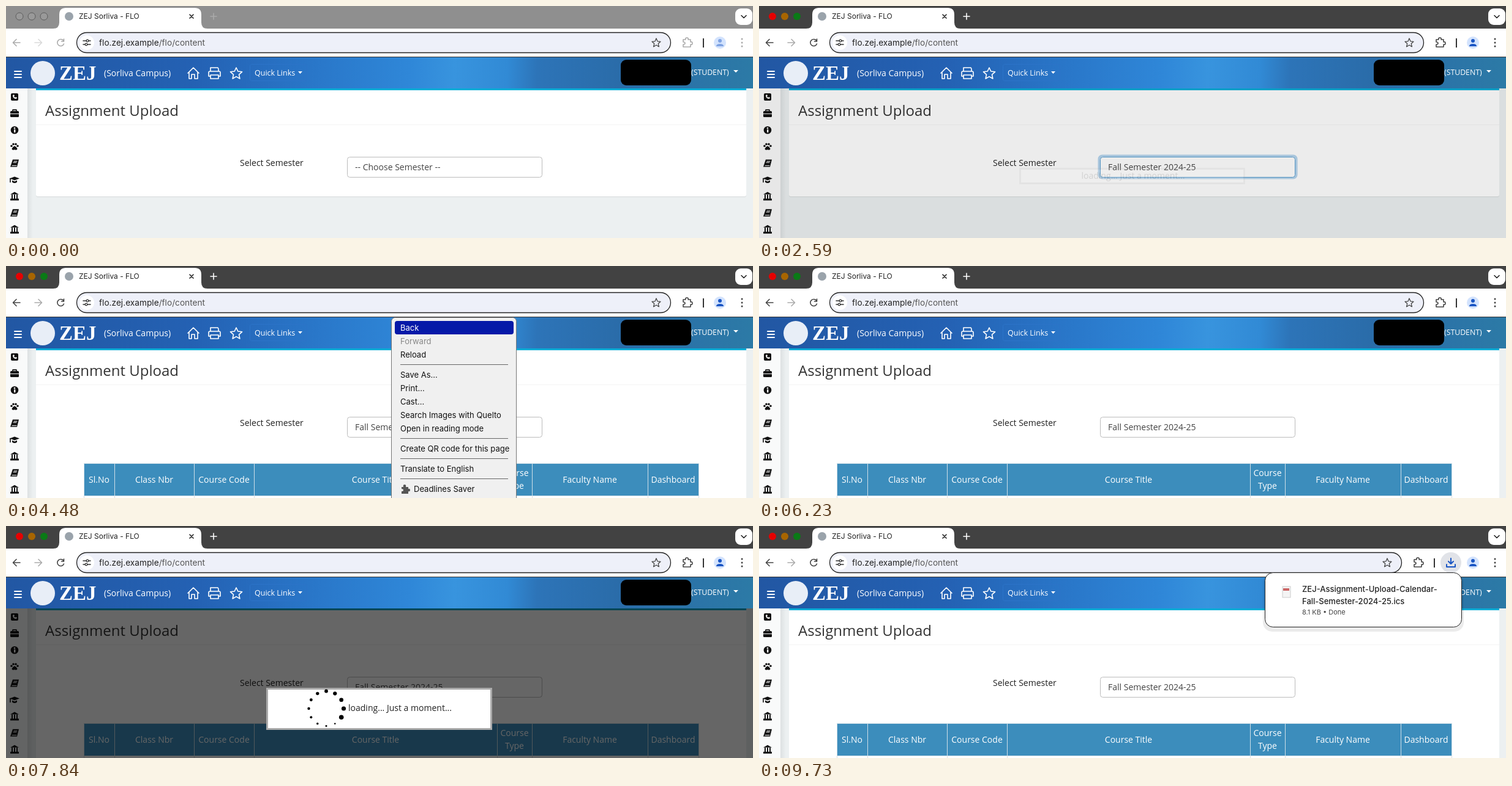
An HTML page that plays this animation: 1220 by 380 pixels, repeating every 9.94 s.

```html
<!DOCTYPE html>
<html lang="en">
<head>
<meta charset="utf-8">
<style>
html, body { margin: 0; width: 100%; height: 100%; overflow: hidden; background: #ecf0f1; }
svg { display: block; }
text { font: 14px "Open Sans", sans-serif; fill: #222; white-space: pre; }
.ui text, text.ui { font-family: Inter, sans-serif; }
.mid { text-anchor: middle; }
.line { fill: none; stroke: currentColor; stroke-width: 1.6; stroke-linecap: round; stroke-linejoin: round; }
.white { fill: #fff; }
.th { fill: #fff; text-anchor: middle; }
</style>
</head>
<body>
<svg id="stage" width="1220" height="380" viewBox="0 0 1220 380"></svg>
<script>
const LOOP = 9940;
const stage = document.getElementById('stage');
const $ = id => document.getElementById(id);

const text = (x, y, s, attrs = '') => `<text x="${x}" y="${y}" ${attrs}>${s}</text>`;
const rect = (x, y, w, h, fill, attrs = '') =>
  `<rect x="${x}" y="${y}" width="${w}" height="${h}" fill="${fill}" ${attrs}/>`;
const circle = (x, y, r, fill, attrs = '') => `<circle cx="${x}" cy="${y}" r="${r}" fill="${fill}" ${attrs}/>`;
const line = (d, attrs = '') => `<path class="line" d="${d}" ${attrs}/>`;
const at = (x, y, body) => `<g transform="translate(${x} ${y})">${body}</g>`;

// Loading messages: [fade in starts, fade out starts]
const loads = [[2545, 3170], [6290, 6850], [6850, 7050], [7460, 8050], [8050, 8700]];

const options = ['-- Choose Semester --', 'Fall Semester 2024-25', 'Summer Semester 2023-24', 'Winter Semester 2023-24'];

const menu = [
  [101, 'Back'], [123, 'Forward'], [145, 'Reload'], [178, 'Save As...'], [200, 'Print...'], [222, 'Cast...'],
  [244, 'Search Images with Quelto'], [266, 'Open in reading mode'],
  [299, 'Create QR code for this page'], [332, 'Translate to English'], [365, 'Deadlines Saver']
];
// Hovered menu row: [time, row]
const hovers = [[4480, 0], [4550, 2], [4620, 3], [4690, 4], [4760, 6], [4830, 7], [4970, 8], [5110, 9], [5180, 10]];

const icons = {
  phone: rect(-6, -6, 12, 12, '#111', 'rx="2"') +
    '<path d="M-3-3q0 6 6 6l1-2-2-1-1 1q-2-1-2-2l1-1-1-2z" fill="#fff"/>',
  briefcase: rect(-7, -4, 14, 10, '#111', 'rx="1.5"') + line('M-3-4v-2h6v2') + rect(-7, 0, 14, 1, '#fff'),
  info: circle(0, 0, 6.3, '#111') + rect(-1, -1, 2.4, 5, '#fff') + circle(0, -3.2, 1.3, '#fff'),
  paw: '<path d="M0-1q3 1 4.500 4.500q0 3-4.500 1.500q-4.500 1.500-4.500-1.500q1.500-3.500 4.500-4.500z"/>' +
    [[-5, -1], [-2, -4], [2, -4], [5, -1]].map(([x, y]) => circle(x, y, 1.7, '#111')).join(''),
  book: '<path d="M-3-6h10l-3 12h-11z"/>' + line('M-1-3h5M-2-1h5M-4 4h7', 'style="color:#fff;stroke-width:1"'),
  cap: '<path d="M-8-2l8-3 8 3-8 3zM-4 1l4 2 4-2v3q-4 3-8 0z"/>' + line('M-7-2v6'),
  bank: '<path d="M-7-3l7-4 7 4zM-7 4h14v3h-14z"/>' + line('M-4-2v6M0-2v6M4-2v6', 'style="stroke-width:2"')
};
const sidebar = ['phone', 'briefcase', 'info', 'paw', 'book', 'cap', 'bank', 'book', 'bank']
  .map((name, i) => at(14, 149 + i * 27.1, icons[name])).join('');

function tableHead(edges, top, height, labels) {
  return edges.slice(1).map((right, i) => {
    const left = edges[i], mid = (left + right) / 2, lines = labels[i].split('|');
    return rect(left + .5, top + .5, right - left, height, '#3c8dbc', 'stroke="#cfdfe8"') +
      lines.map((s, k) => text(mid, top + height / 2 + 5 + (k - (lines.length - 1) / 2) * 21, s, 'class="th"')).join('');
  }).join('');
}

const listCols = [127, 177, 307, 405, 802, 859, 1048, 1131];
const detailCols = [72, 333, 489, 881, 1037, 1187];

const page = `
  ${rect(0, 135, 1220, 245, '#ecf0f1')}
  ${rect(0, 135, 35, 245, '#f9fafa')}
  ${rect(35, 135, 9, 245, 'url(#edge)')}
  <g style="color:#111" fill="#111">${sidebar}</g>
  ${rect(49, 137, 1160, 176, '#d5d9da', 'id="shade" rx="3"')}
  ${rect(49, 135, 1160, 177, '#fff', 'id="card" rx="3"')}
  ${rect(49, 135, 1160, 3, '#00acd6')}
  ${rect(49, 194, 1160, 1, '#f4f4f4')}
  ${text(64, 180, 'Assignment Upload', 'style="font-size:24px;fill:#333"')}
  <g id="list">
    ${text(382, 262, 'Select Semester')}
    ${rect(555.5, 245.5, 322, 36, 'none', 'id="ring" rx="5" stroke="#b5d5ee" stroke-width="4"')}
    ${rect(557.5, 247.500, 318, 33, '#fff', 'id="box" rx="4" stroke="#bbb"')}
    ${text(570, 269, '', 'id="choice" style="fill:#444"')}
    <g id="courses">
      ${tableHead(listCols, 323, 53, ['Sl.No', 'Class Nbr', 'Course Code', 'Course Title', 'Course|Type', 'Faculty Name', 'Dashboard'])}
      ${listCols.map(x => rect(x, 377, 1, 3, '#ddd')).join('')}
    </g>
  </g>
  <g id="details">
    ${tableHead(detailCols, 226, 32, ['Semester', 'Course Code', 'Course Title', 'Course Type', 'Class Number'])}
    ${detailCols.map(x => rect(x, 259, 1, 31, '#ddd')).join('')}
    ${rect(72, 290, 1116, 1, '#ddd')}
    ${text(77, 279, 'Fall Semester 2024-25')}
    ${text(338, 279, '', 'id="code"')}
    ${text(886, 279, 'LO')}
    ${text(1043, 279, '', 'id="number"')}
    ${['Notes:', '1. File size (Max. upto 4MB)', '2. File type should be pdf,xls,xlsx,doc,docx']
      .map((s, i) => text(75, 328 + i * 21, s, 'style="fill:#f00"')).join('')}
  </g>`;

const header = `
  ${rect(0, 84, 1220, 51, 'url(#sky)')}
  ${line('M14 107h11M14 112h11M14 117h11', 'style="color:#fff;stroke-width:2"')}
  ${circle(60, 110, 20, '#e8eef7')}
  ${text(87, 121, 'ZEJ', 'class="white" style="font:bold 33px \'Liberation Serif\',serif"')}
  ${text(160, 115, '(Sorliva Campus)', 'class="white"')}
  <g style="color:#fff">
    ${line('M297 110l9-9 9 9M299 109v10h4v-7h5v7h5v-10')}
    ${line('M334 107v-6h12l1 2v4M334 115h-3v-6q0-2 2-2h15q2 0 2 2v6h-3M334 113h13v6h-13z')}
    ${at(376, 110, line('M0-9l2.800 6 6.700.8-5 4.500 1.400 6.700-5.900-3.400-5.900 3.400 1.400-6.700-5-4.500 6.700-.8z'))}
  </g>
  ${rect(398.500, 95.500, 93, 27, 'none', 'rx="3" stroke="#2c73c8"')}
  ${text(406, 113.500, 'Quick Links', 'class="white" style="font-size:12.500px"')}
  <path d="M477 107h7l-3.500 4zM1188 105h8l-4 4z" fill="#fff"/>
  ${text(1119, 112.500, '(STUDENT)', 'class="white" style="font-size:12.300px"')}
  ${rect(1004, 88, 115, 42, '#000', 'rx="9"')}`;

const lights = ['#e60000', '#a86500', '#0a7a16'];
const chrome = `
  ${rect(0, 0, 1220, 84, '#fff')}
  ${rect(0, 0, 1220, 37, '#424242', 'id="strip"')}
  ${lights.map((c, i) => circle(22 + i * 20, 17, 6, c, 'class="light"')).join('')}
  <path d="M77 37q10 0 10-10V14q0-11 11-11H308q11 0 11 11V27q0 10 10 10z" fill="#fff"/>
  ${circle(103, 17, 7, '#9aa3ab')}
  ${text(119, 21, 'ZEJ Sorliva - FLO', 'style="font-size:12px"')}
  ${line('M300 14l6 6m0-6l-6 6', 'style="color:#222"')}
  ${line('M334 17h10m-5-5v10', 'id="plus"')}
  ${rect(1191, 4, 28, 27, '#fff', 'rx="9"')}
  ${line('M1201 15.500l4 4 4-4', 'style="color:#222"')}
  <g id="tools" style="color:#444">
    ${line('M23 60H12m5-5.500l-5.500 5.500 5.500 5.500M94 57a5.500 5.500 0 1 0 .5 5M94.500 54v4h-4')}
    ${line('M47 60h11m-5-5.500l5.500 5.500-5.500 5.500', 'opacity=".45"')}
    ${[54, 60, 66].map(y => circle(1202, y, 1.5, 'currentColor')).join('')}
  </g>
  ${rect(115.500, 43.500, 970, 33, '#eef0f9', 'id="omni" rx="16.500" stroke="#222" stroke-width="1.300"')}
  ${circle(132, 60, 12, '#fff')}
  ${line('M126 57h5M135 57h3M126 63h3M133 63h5', 'style="color:#333"')}
  ${circle(133, 57, 1.8, 'none', 'stroke="#333" stroke-width="1.300"')}
  ${circle(131, 63, 1.8, 'none', 'stroke="#333" stroke-width="1.300"')}
  ${text(152, 65, 'flo.zej.example<tspan fill="#555">/flo/content</tspan>', 'style="font-size:13.700px"')}
  <g id="shift" style="color:#444">
    ${at(1062, 60, line('M0-7l2 4.800 5 .5-3.800 3.400 1.200 5-4.400-2.700-4.400 2.700 1.200-5-3.800-3.400 5-.5z', 'style="stroke-width:1.300"'))}
    ${line('M1106 55h4q-1-3 2-3t2 3h4v4q3-1 3 2t-3 2v4h-12v-4q3 0 3-2t-3-2z', 'id="puzzle"')}
    ${rect(1138, 53, 2, 15, '#333')}
  </g>
  ${circle(1166, 60, 10, '#d3e3fd')}
  <g id="person" fill="#1a56c4">${circle(1166, 57, 3)}<path d="M1160 66q0-4 6-4t6 4z"/></g>
  <g id="download">
    ${circle(1130, 60, 17, '#e1e3e8')}
    ${line('M1130 53v9m-4-4l4 4 4-4M1123 63v4h14v-4', 'style="color:#1a56c4;stroke-width:2"')}
  </g>
  ${rect(0, 83, 1220, 1, '#333')}`;

const popup = `
  ${rect(557.500, 247.500, 318, 98, '#f0f0f0', 'rx="6" stroke="#999"')}
  ${rect(562, 253, 309, 22, '#0519a8', 'id="optionBar" rx="4"')}
  ${options.map((s, i) => text(578, 268.500 + i * 22, s, 'class="option" style="font-size:13px"')).join('')}`;

const context = `
  ${rect(629.500, 84.500, 204, 320, '#f0f0f0', 'rx="6" stroke="#777"')}
  ${rect(635, 90, 194, 22, '#0519a8', 'id="menuBar" rx="4"')}
  ${[161, 282, 315, 348].map(y => rect(644, y, 176, 1, '#666')).join('')}
  ${menu.map(([y, s], i) => text(i === 10 ? 666 : 644, y + 4.700, s, 'class="entry" style="font-size:13px"')).join('')}
  <path d="M646 362h3q-1-4 2-4t2 4h4v3q3-1 3 2t-3 2v4h-11v-4q3 0 3-2t-3-2z" fill="#555"/>`;

const bubble = `
  ${rect(823, 78, 328, 95, '#000', 'rx="15" opacity=".08"')}
  ${rect(826.500, 76.500, 321, 89, '#fff', 'rx="13" stroke="#222"')}
  ${rect(855, 99, 13, 18, '#f4f4f4', 'stroke="#ccc"')}${rect(856, 102, 10, 4, '#c66')}
  ${text(887, 108, 'ZEJ-Assignment-Upload-Calendar-', 'style="font-size:13px;font-weight:500"')}
  ${text(887, 128, 'Fall-Semester-2024-25.ics', 'style="font-size:13px;font-weight:500"')}
  ${text(887, 145, '8.1 KB • Done', 'style="font-size:11px;fill:#444"')}`;

const modal = `
  <g class="modal">
    ${rect(426.500, 266.500, 366, 24, '#fff', 'class="panel" stroke="#aaa" stroke-width="3"')}
    <g class="small">${text(611, 283, 'loading... Just a moment...', 'class="mid"')}</g>
    <g class="big"><use href="#spinner"/>${text(559, 303, 'loading... Just a moment...')}</g>
  </g>`;

const dots = Array.from({ length: 12 }, (_, i) => {
  const a = i * Math.PI / 6;
  return circle(523 + 28.5 * Math.cos(a), 299 + 28.5 * Math.sin(a), 2, '#000', 'class="dot"');
}).join('');

stage.innerHTML = `
  <defs>
    <linearGradient id="sky" gradientUnits="userSpaceOnUse" x1="0" y1="110" x2="1220" y2="150">
      ${[[0, '#2257a3'], [.25, '#2461b3'], [.43, '#2a79cb'], [.54, '#2f87d8'], [.6, '#3894de'], [.67, '#318ad5'],
        [.71, '#2d74b8'], [.82, '#2a6ca9'], [1, '#2c7aa6']]
        .map(([o, c]) => `<stop offset="${o}" stop-color="${c}"/>`).join('')}
    </linearGradient>
    <linearGradient id="edge"><stop stop-color="#dde1e2"/><stop offset="1" stop-color="#ecf0f1"/></linearGradient>
    <g id="spinner">${dots}</g>
  </defs>
  ${page}
  ${loads.map(() => rect(0, 135, 1220, 245, '#000', 'class="veil"')).join('')}
  ${loads.map(() => modal).join('')}
  ${header}
  <g class="ui">${chrome}</g>
  ${circle(1130, 72, 0, '#888', 'id="ripple"')}
  <g class="ui" id="popup">${popup}</g>
  <g class="ui" id="context">${context}</g>
  <g class="ui" id="bubble">${bubble}</g>`;

const all = s => [...stage.querySelectorAll(s)];
const veils = all('.veil'), modals = all('.modal'), dotEls = all('.dot');
const optionEls = all('.option'), entryEls = all('.entry'), lightEls = all('.light');

const clamp = v => Math.max(0, Math.min(1, v));
const ramp = (t, start, length) => clamp((t - start) / length);
const swing = p => .5 - Math.cos(p * Math.PI) / 2;
const show = (el, on) => { el.style.display = on > 0 ? '' : 'none'; el.style.opacity = +on; };
const mix = (a, b, p) => Math.round(a + (b - a) * p);

function drawWindow(t) {
  const focus = ramp(t, 430, 130), grey = mix(143, 66, focus);
  $('strip').setAttribute('fill', `rgb(${grey},${grey},${grey})`);
  lightEls.forEach((el, i) => {
    el.setAttribute('fill', focus > .4 ? lights[i] : '#999');
    el.setAttribute('stroke', focus > .4 ? 'none' : '#5c5c5c');
  });
  $('plus').style.color = focus > .4 ? '#fff' : '#aaa';
  for (const id of ['tools', 'puzzle', 'person']) $(id).style.opacity = .45 + .55 * focus;

  const downloading = t >= 8330;
  $('omni').setAttribute('width', downloading ? 934 : 970);
  $('shift').setAttribute('transform', `translate(${downloading ? -36 : 0})`);
  show($('download'), downloading);
  show($('bubble'), ramp(t, 8400, 120));
  const spread = ramp(t, 8400, 620);
  show($('ripple'), spread > 0 ? .16 * (1 - spread) : 0);
  $('ripple').setAttribute('r', 12 + 62 * spread);
}

function drawPage(t) {
  const first = t >= 6850 && t < 7050, second = t >= 8050 && t < 8700;
  const details = first || second, loaded = t >= 3170;
  show($('details'), details);
  show($('list'), !details);
  show($('courses'), loaded);
  $('card').setAttribute('height', loaded ? 260 : 177);
  $('code').textContent = first ? 'QXAL204K' : 'QZOR204K';
  $('number').textContent = first ? 'QM3917460285513' : 'QM3917460284409';
  $('choice').textContent = options[t >= 2100 ? 1 : 0];
  const focused = t >= 1120 && t < 3170;
  show($('ring'), focused);
  $('box').setAttribute('stroke', focused ? '#5a9fd0' : '#bbb');
}

function drawMenus(t) {
  show($('popup'), ramp(t, 1100, 80) * (1 - ramp(t, 2100, 200)));
  const picked = t < 1610 ? 0 : 1;
  $('optionBar').setAttribute('y', 253 + picked * 22);
  optionEls.forEach((el, i) => el.style.fill = i === picked ? '#fff' : '#111');

  show($('context'), ramp(t, 3970, 80) * (1 - ramp(t, 5650, 200)));
  const hover = hovers.filter(h => t >= h[0]).pop();
  const row = hover ? hover[1] : -1;
  show($('menuBar'), row >= 0);
  if (row >= 0) $('menuBar').setAttribute('y', menu[row][0] - 11);
  entryEls.forEach((el, i) => el.style.fill = i === row ? '#fff' : i === 1 ? '#888' : '#111');
}

function drawLoading(t) {
  loads.forEach(([start, end], i) => {
    const alpha = swing(ramp(t, start, 200)) * (1 - swing(ramp(t, end, 400)));
    const big = t >= start + 250;
    show(veils[i], .6 * alpha);
    show(modals[i], alpha);
    modals[i].querySelector('.panel').setAttribute('height', big ? 66 : 24);
    show(modals[i].querySelector('.small'), !big);
    show(modals[i].querySelector('.big'), big);
  });
  const lead = Math.floor((t + 450) / 62) % 12;
  dotEls.forEach((el, i) => {
    const age = (lead - i + 12) % 12;
    el.setAttribute('r', 1.3 + 2.5 * (1 - age / 11));
  });
}

function frame() {
  const t = performance.now() % LOOP;
  drawWindow(t);
  drawPage(t);
  drawMenus(t);
  drawLoading(t);
  requestAnimationFrame(frame);
}
frame();
</script>
</body>
</html>
```
